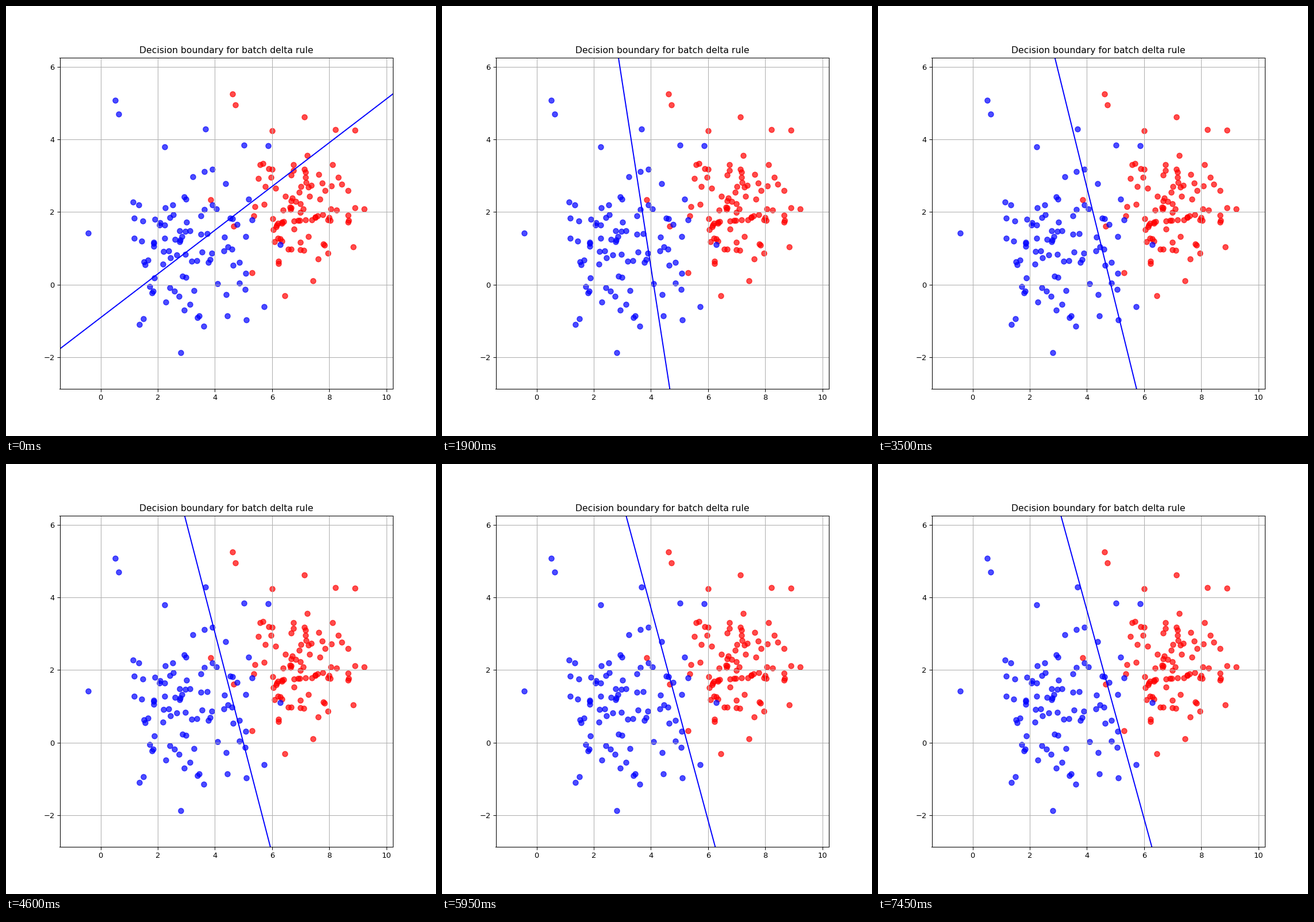
Animation of 748 by 748 pixels, one loop 7500 ms. Source, as a matplotlib script:

```python
import matplotlib.pyplot as plt
import numpy as np
from matplotlib.animation import FuncAnimation

STEPS, INTERVAL = 150, 50
PER_CLASS = 100

# Far points that set each cloud's outline.
BLUE_FAR = [
    (0.52, 5.08), (0.63, 4.70), (-0.43, 1.42), (3.67, 4.29), (2.24, 3.80),
    (5.01, 3.85), (5.87, 3.83), (1.36, -1.10), (2.80, -1.87), (5.09, -0.98),
    (5.72, -0.60), (6.28, 1.11),
]
RED_FAR = [
    (4.61, 5.26), (4.71, 4.96), (6.00, 4.24), (7.13, 4.62), (8.21, 4.28),
    (8.90, 4.26), (3.85, 2.34), (4.65, 1.61), (5.29, 0.32), (6.44, -0.30),
    (8.83, 1.04), (9.22, 2.08),
]

# Boundary x = cross - tilt * y at a few steps: (step, tilt, cross)
POSES = [
    (0, -1.658, 1.51), (23, -0.003, 3.44), (54, 0.2887, 4.553),
    (70, 0.3129, 4.836), (92, 0.3284, 4.994), (119, 0.3415, 5.267),
    (149, 0.3482, 5.269),
]
TILT_LIMIT, CROSS_LIMIT = 0.355, 5.4

rng = np.random.default_rng(4)
steps, tilts, crosses = np.array(POSES).T


def cloud(far, mean, std):
    """Fill a class up with normal samples within two deviations."""
    z = rng.normal(size=(2 * PER_CLASS, 2))
    z = z[np.hypot(*z.T) < 2][:PER_CLASS - len(far)]
    return np.vstack([far, mean + z * std])


def approach(step, values, limit):
    """Exponential decay towards a limit, passing through the values."""
    return limit - np.exp(np.interp(step, steps, np.log(limit - values)))


fig, ax = plt.subplots(figsize=(8, 8), dpi=93.5)
red = cloud(RED_FAR, (7.0, 1.9), (1.0, 1.05))
blue = cloud(BLUE_FAR, (3.2, 1.0), (1.35, 1.3))
for pts, color in ((red, "red"), (blue, "blue")):
    ax.scatter(*pts.T, s=50, color=color, alpha=0.7)
ax.set(xlim=(-1.43, 10.23), ylim=(-2.87, 6.26),
       title="Decision boundary for batch delta rule")
ax.grid(True)
(line,) = ax.plot([], [], "b-")


def update(step):
    y = np.array([-10.0, 15.0])
    tilt = approach(step, tilts, TILT_LIMIT)
    cross = approach(step, crosses, CROSS_LIMIT)
    line.set_data(cross - tilt * y, y)
    return (line,)


anim = FuncAnimation(fig, update, frames=STEPS, interval=INTERVAL,
                     repeat=True, repeat_delay=0)
plt.show()
```
